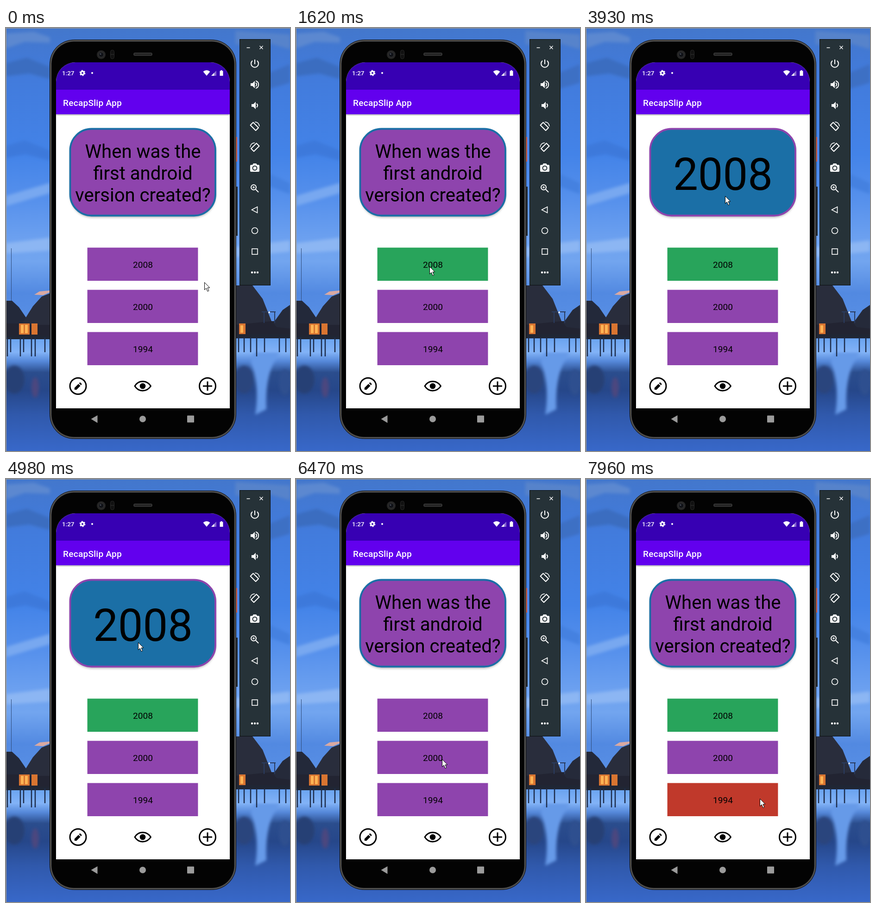
An HTML page for the animation above (8 s loop, 613 px wide and 912 px high).

```html
<!DOCTYPE html>
<html lang="en">
<head>
<meta charset="utf-8">
<title>Quiz card demo</title>
<style>
  html, body { margin: 0; width: 100%; height: 100%; overflow: hidden; background: #3f7fdc; }
  svg { display: block; width: 613px; height: 912px; }
  text { font-family: Roboto, Arial, sans-serif; }
  .mid { text-anchor: middle; }
  .line { fill: none; stroke: #fff; stroke-width: 2; }
  .thin { stroke-width: 1.4; }
</style>
</head>
<body>
<svg viewBox="0 0 613 912" xmlns="http://www.w3.org/2000/svg">
  <defs>
    <linearGradient id="sky" x2="0" y2="1">
      <stop offset="0" stop-color="#4377cc"/><stop offset=".16" stop-color="#427bdc"/>
      <stop offset=".4" stop-color="#4383e8"/><stop offset=".55" stop-color="#5791ec"/>
      <stop offset=".68" stop-color="#6ea2f0"/><stop offset=".74" stop-color="#72a5ef"/>
      <stop offset=".84" stop-color="#5289e1"/><stop offset="1" stop-color="#5c93e8"/>
    </linearGradient>
    <linearGradient id="sea" x2="0" y2="1">
      <stop offset="0" stop-color="#6ba4f0"/><stop offset=".12" stop-color="#82b3f7"/>
      <stop offset=".2" stop-color="#5689da"/><stop offset=".3" stop-color="#2b4d8d"/>
      <stop offset=".46" stop-color="#26478a"/><stop offset=".68" stop-color="#3059ac"/>
      <stop offset="1" stop-color="#3868c9"/>
    </linearGradient>
    <filter id="soft" x="-30%" y="-80%" width="160%" height="260%"><feGaussianBlur stdDeviation="3"/></filter>
    <filter id="shade" x="-10%" y="-10%" width="120%" height="125%"><feGaussianBlur stdDeviation="2"/></filter>
    <clipPath id="screen"><path d="M108 820V116A42 42 0 0 1 150 74H441A42 42 0 0 1 483 116V820Z"/></clipPath>
  </defs>

  <g id="scenery">
    <rect width="613" height="680" fill="url(#sky)"/>
    <g filter="url(#soft)">
      <path d="M0 12L60 8L95 20V32L40 30L0 44Z" fill="#5b88d0"/>
      <path d="M0 76L45 64L95 84V110L50 98L0 104Z" fill="#3b6dc0"/>
      <path d="M0 254L40 242L95 264V286L42 272L0 280Z" fill="#3d79db"/>
      <path d="M0 362L95 334V356L0 384Z" fill="#78a8f0"/>
      <path d="M0 464L95 452V480L0 486Z" fill="#8cb6f3"/>
      <path d="M495 6L613 14V46L560 30L495 36Z" fill="#5683cb"/>
      <path d="M565 98L613 78V118L565 132Z" fill="#3d70c4"/>
      <path d="M565 312L613 334V358L565 340Z" fill="#4581e0"/>
      <path d="M495 472L613 458V482L495 494Z" fill="#8cb6f3"/>
    </g>
    <path d="M61 575L72 568L94 566V570L80 576Z" fill="#d9a9a2"/>
    <path d="M11.500 475V595" stroke="#304d7d"/>
    <rect y="670" width="613" height="242" fill="url(#sea)"/>
    <g filter="url(#soft)">
      <ellipse cx="63" cy="775" rx="8" ry="22" fill="#4b477f"/>
      <ellipse cx="18" cy="758" rx="22" ry="30" fill="#263f75"/>
      <ellipse cx="514" cy="758" rx="20" ry="30" fill="#29457d"/>
      <path d="M536 700H592Q558 740 562 822L538 834Q548 770 528 720Z" fill="#669ae8"/>
      <ellipse cx="602" cy="764" rx="13" ry="28" fill="#2f508f"/>
    </g>
    <path d="M0 632H95V668H0ZM495 632H613V668H495Z" fill="#222432"/>
    <path d="M0 588H13L28 602L52 637H0Z" fill="#23293a"/>
    <path d="M36 635L58 600L77 579L95 572V640H43Z" fill="#292d3c"/>
    <path d="M495 555H532L554 584L573 632L495 640Z" fill="#292d3c"/>
    <path d="M577 636L597 608L613 597V648L584 645Z" fill="#252a3a"/>
    <path d="M552 612H582M557 612V636M580 612V636" fill="none" stroke="#2a3c60" stroke-width="2"/>
    <path d="M28 637H51V661H28ZM55 637H68V661H55ZM503 637H517V661H503Z" fill="#d97531"/>
    <path d="M32 640H38V658H32ZM41 640H47V658H41ZM506 641H512V657H506Z" fill="#ffb454"/>
    <path d="M0 663H95V671H0ZM495 660H613V669H495Z" fill="#202634"/>
    <g id="stilts" stroke="#1d2c4a" stroke-width="2.500"/>
    <circle cx="568" cy="613" r="2" fill="#eaf3ff"/>
    <path d="M.5 912V.5H613" fill="none" stroke="#a19a90"/>
  </g>

  <g id="phone">
    <path d="M496 235H499V288H496Z" fill="#f0694d"/>
    <path d="M496 342H500V448H496Z" fill="#252c35"/>
    <rect x="94.500" y="25.500" width="402" height="860" rx="52" fill="#3c3c3c" stroke="#141414"/>
    <rect x="96.500" y="27.500" width="398" height="856" rx="50" fill="none" stroke="#6a6a6a"/>
    <rect x="98.500" y="29.500" width="394" height="852" rx="48" fill="#030303"/>
    <circle cx="205.500" cy="57.500" r="9.500" fill="#242424"/>
    <circle cx="205.500" cy="57.500" r="5.500" fill="#101217" stroke="#3a3a3a"/>
    <circle cx="204" cy="56" r="1.500" fill="#4b5360"/>
    <rect x="225.500" y="47.500" width="8" height="19" rx="4" fill="#111" stroke="#292929"/>
    <path d="M226 57H233" stroke="#333"/>
    <rect x="275" y="53" width="41" height="7" rx="3.500" fill="#343434"/>
    <path d="M278 56.500H313" stroke="#171717" stroke-width="3" stroke-dasharray="2 1"/>
    <g clip-path="url(#screen)">
      <rect x="108" y="74" width="375" height="746" fill="#fff"/>
      <rect x="108" y="182" width="375" height="6" fill="#aaa" filter="url(#shade)"/>
      <rect x="108" y="74" width="375" height="60" fill="#3700b3"/>
      <rect x="108" y="133" width="375" height="53" fill="#6200ee"/>
    </g>
    <g fill="#fff">
      <text x="121" y="102" font-size="13.400" font-weight="500">1:27</text>
      <circle cx="165" cy="97" r="3.500" fill="none" stroke="#fff" stroke-width="3"/>
      <circle cx="165" cy="97" r="5.400" fill="none" stroke="#fff" stroke-width="2" stroke-dasharray="2.900 2.755"/>
      <circle cx="186" cy="97" r="2"/>
      <path d="M425.500 94Q433 88 440.500 94L433 103Z"/>
      <path d="M443 103L454 92V103Z" opacity=".4"/><path d="M443 103L449.500 96.500V103Z"/>
      <path d="M461.500 92.500H463.500V91H466.500V92.500H468.500V103H461.500Z"/>
      <text x="123" y="168" font-size="19.100" font-weight="500" letter-spacing=".24">RecapSlip App</text>
    </g>
    <rect x="138" y="219" width="315" height="190" rx="48" fill="#999" opacity=".6" filter="url(#shade)"/>
    <rect id="card" x="138.500" y="217.500" width="313.500" height="187" rx="46" stroke-width="3.800"/>
    <g id="question" class="mid" font-size="40.100">
      <text x="295.500" y="280">When was the</text>
      <text x="295.500" y="327">first android</text>
      <text x="295.500" y="374">version created?</text>
    </g>
    <text id="answer" class="mid" x="295.500" y="349" font-size="95.500">2008</text>
    <g id="choices" class="mid" font-size="19.100"></g>
    <g fill="none" stroke="#000" stroke-width="3">
      <circle cx="155.500" cy="772" r="17.500"/>
      <circle cx="435" cy="772" r="17.500"/>
      <path d="M425 772H445M435 762V782"/>
      <path d="M278 772Q284 762 295 762T312.500 772Q306 782 295 782T278 772Z" stroke-width="2.800"/>
    </g>
    <circle cx="295" cy="772" r="6.300"/>
    <path transform="translate(155.500 772) scale(.85) translate(-156 -771.500)"
      d="M147 781V776L157 766L162 771L152 781ZM158.500 764.500L160.500 762.500Q161.500 762 162.500 763L165 765.500Q166 766.500 165 767.500L163.500 769.500Z"/>
    <g fill="#9b9b9b">
      <path d="M183.500 843L197.500 835V851.500Z"/><circle cx="295" cy="843" r="7"/>
      <rect x="391" y="835.500" width="15" height="15" rx="1"/>
    </g>
  </g>

  <g id="toolbar">
    <rect x="504.500" y="24.500" width="66" height="530" fill="#263238" stroke="#090d0f"/>
    <path class="line thin" d="M519.500 42.500H526.500M547.500 38.500L554.500 45.500M554.500 38.500L547.500 45.500"/>
    <g class="line" transform="translate(537 77)"><path d="M0-9V1M-5-6.500A8 8 0 1 0 5-6.500"/></g>
    <g class="line" transform="translate(537 122)">
      <path d="M-9-3H-5L0-8V8L-5 3H-9Z" fill="#fff" stroke="none"/>
      <path d="M2-4Q6 0 2 4M2-8A8.300 8.300 0 0 1 2 8"/>
    </g>
    <g class="line" transform="translate(537 167)">
      <path d="M-7-3H-3L2-8V8L-3 3H-7Z" fill="#fff" stroke="none"/><path d="M4-4Q8 0 4 4"/>
    </g>
    <g id="turnLeft" class="line" transform="translate(537 212)">
      <path d="M-9.500-2.500L-3.500-8.500L8 3L2 9Z" stroke-linejoin="round"/>
      <path class="thin" d="M0-9.500Q9-9 10 0"/>
    </g>
    <use href="#turnLeft" transform="translate(1074 45) scale(-1 1)"/>
    <g transform="translate(537 301)">
      <path d="M-8-6H-5L-3-9H3L5-6H8Q10-6 10-4V7Q10 9 8 9H-8Q-10 9-10 7V-4Q-10-6-8-6Z" fill="#fff"/>
      <circle cy="1" r="4.500" fill="#fff" stroke="#263238" stroke-width="2"/>
    </g>
    <g class="line" transform="translate(537 346)">
      <circle cx="-2.500" cy="-2.500" r="5.500"/><path d="M2 2L8 8"/>
      <path class="thin" d="M-5-2.500H0M-2.500-5V0"/>
    </g>
    <g class="line" style="stroke-width:1.600">
      <path d="M530.500 392L542.500 385.500V398.500Z"/><circle cx="537" cy="437" r="6.500"/>
      <rect x="531" y="476" width="12" height="12"/>
    </g>
    <g fill="#fff"><circle cx="531" cy="527" r="2.200"/><circle cx="537" cy="527" r="2.200"/><circle cx="543" cy="527" r="2.200"/></g>
  </g>

  <path id="cursor" d="M.5.500V16.500L4.200 13L7 19.800L9.800 18.600L7 12H11.800Z" fill="#fff" stroke="#000"/>
</svg>

<script>
const LOOP = 8000;
const PURPLE = '#8e44ad', BLUE = '#1b6fa6', GREEN = '#28a45b', RED = '#c0392b';
const byId = id => document.getElementById(id);
const within = (t, start, end) => t >= start && t < end;

// Pointer runs: first move, last move, then evenly timed x,y stops.
const RUNS = [
  [0, 0, '428,548'],
  [270, 1230, '415,563 385,579 342,560 304,522 281,490 273,504 280,529 290,542'],
  [1350, 1480, '290,529 288,514'],
  [2180, 2870, '294,492 318,452 344,410 356,380 345,365 335,363'],
  [3930, 4860, '300,362 304,358 307,354 306,350 302,348 298,349 296,351 294,352'],
  [4980, 4980, '285,352'],
  [5260, 5800, '288,360 316,406 364,470 405,522 419,542'],
  [6170, 6455, '408,560 352,590 315,604'],
  [6870, 7320, '330,606 376,610 422,613 440,614'],
  [7600, 7710, '408,656 375,689']
];
const stops = RUNS.flatMap(([start, end, route]) => {
  const points = route.split(' ');
  const gap = (end - start) / Math.max(1, points.length - 1);
  return points.map((point, i) => ({ time: start + i * gap, point }));
});

const choices = ['2008', '2000', '1994'].map((year, i) => {
  const y = 473.5 + i * 91;
  byId('choices').insertAdjacentHTML('beforeend',
    `<rect x="175.600" y="${y}" width="238.800" height="71.500"/><text x="295.500" y="${y + 43.5}">${year}</text>`);
  return byId('choices').querySelectorAll('rect')[i];
});

for (const x of [3, 10, 31, 38, 55, 63, 84, 502, 514, 528, 541, 558, 590, 604])
  byId('stilts').insertAdjacentHTML('beforeend', `<path d="M${x} 667V${x % 2 ? 708 : 699}"/>`);

function draw(t) {
  const flipped = within(t, 3930, 5260);
  byId('card').setAttribute('fill', flipped ? BLUE : PURPLE);
  byId('card').setAttribute('stroke', flipped ? PURPLE : BLUE);
  byId('question').style.display = flipped ? 'none' : '';
  byId('answer').style.display = flipped ? '' : 'none';

  const secondPicked = within(t, 6590, 7470), thirdPicked = t >= 7960;
  const revealed = within(t, 1620, 6050) || secondPicked || thirdPicked;
  const fills = [revealed && GREEN, secondPicked && RED, thirdPicked && RED];
  choices.forEach((choice, i) => choice.setAttribute('fill', fills[i] || PURPLE));

  const { point } = stops.findLast(stop => stop.time <= t);
  byId('cursor').setAttribute('transform', `translate(${point})`);
}

function tick() {
  draw(performance.now() % LOOP);
  requestAnimationFrame(tick);
}
tick();
</script>
</body>
</html>
```
